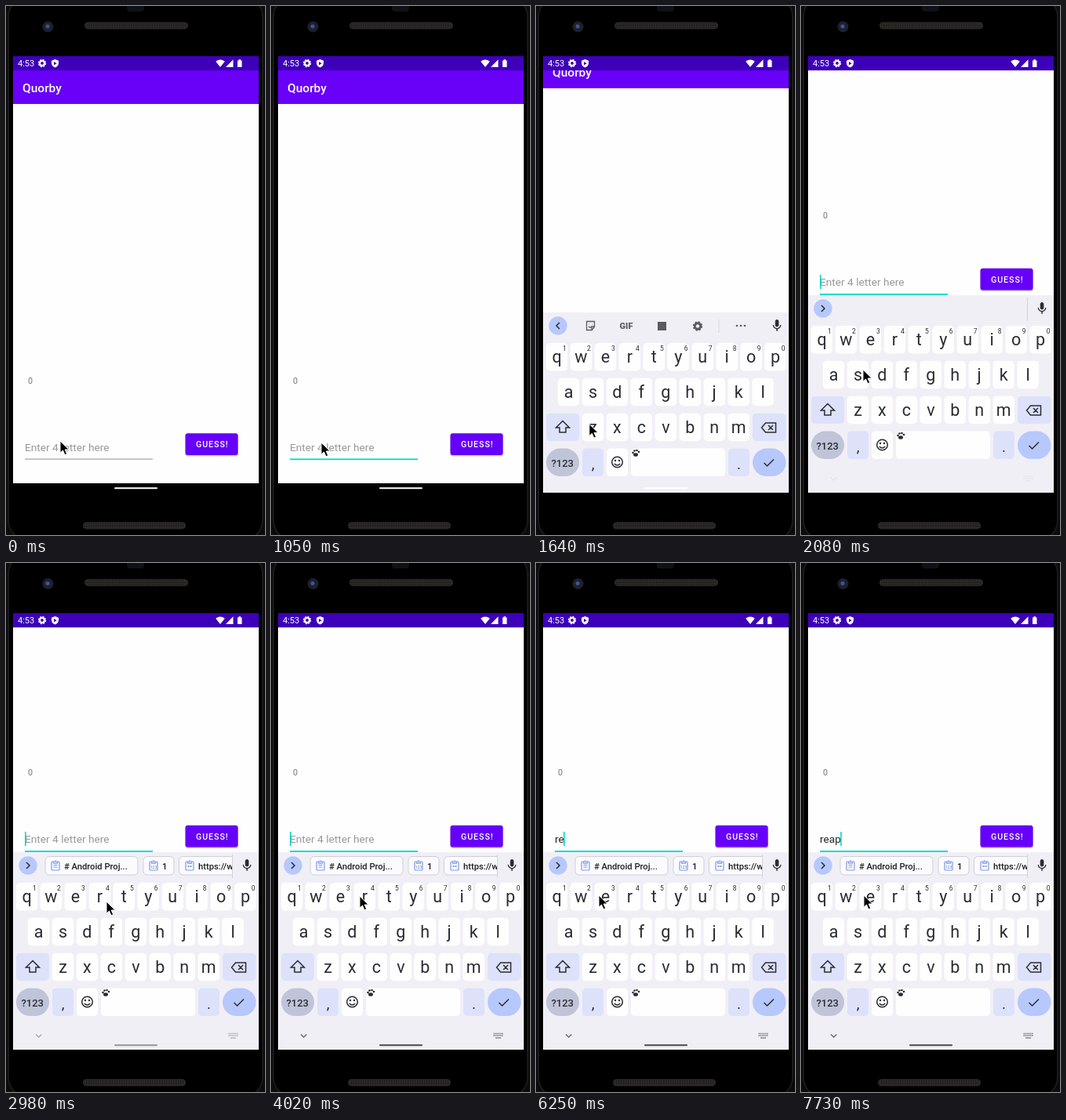
An HTML page for the animation above (8000 ms loop, 330 by 675 pixels).

```html
<!DOCTYPE html>
<html lang="en">
<head>
<meta charset="utf-8">
<style>
  html, body { margin: 0; width: 100%; height: 100%; overflow: hidden; background: #000; }
  svg { display: block; width: 330px; height: 675px; font-family: Roboto, sans-serif; }
  .m { font-weight: 500; }
  .c { text-anchor: middle; }
  .line { fill: none; stroke: #2b2c33; stroke-width: 1.5; }
</style>
</head>
<body>
<svg viewBox="0 0 330 675">
  <defs>
    <clipPath id="app"><rect x="9" y="82" width="313" height="527"/></clipPath>
    <clipPath id="screen"><rect x="9" y="82" width="313" height="539"/></clipPath>
    <clipPath id="strip"><rect x="40" y="370" width="248" height="34"/></clipPath>
    <pattern id="mesh" width="3" height="3" patternUnits="userSpaceOnUse">
      <rect width="3" height="3" fill="#2b2a28"/><rect width="1.5" height="1.5" fill="#181716"/>
    </pattern>
    <g id="gear" fill="none">
      <circle r="3.1" stroke-width="2.4"/>
      <circle r="4.4" stroke-width="1.6" stroke-dasharray="1.9 1.556"/>
    </g>
    <g id="clip" fill="none" stroke="#7f9bea" stroke-width="1.2">
      <rect x="-5" y="-5" width="10" height="11" rx="1"/>
      <path d="M-2.5-5v2.2h5V-5M-1.2-6h2.4"/>
    </g>
  </defs>

  <!-- phone body -->
  <rect width="330" height="675" fill="#0b0b0c"/>
  <rect x="3" y="-12" width="324" height="694" rx="26" stroke="#1a1a1c" stroke-width="2"/>
  <path d="M154 0h22v3q0 4-4 4h-14q-4 0-4-4z" fill="#0f1116"/>
  <circle cx="53.500" cy="26.500" r="7" fill="#202024"/>
  <circle cx="53.500" cy="26.500" r="4.500" fill="#1a2040"/>
  <circle cx="53" cy="26" r="2.500" fill="#42548f"/>
  <g fill="url(#mesh)" stroke="#38362f" stroke-width=".8">
    <rect x="100.500" y="21" width="131" height="8" rx="4"/>
    <rect x="98.500" y="659" width="130" height="8" rx="4"/>
  </g>

  <!-- app -->
  <g clip-path="url(#app)">
    <rect x="9" y="82" width="313" height="527" fill="#fefefe"/>
    <g id="page">
      <rect x="9" y="82" width="313" height="43" fill="#6900f8"/>
      <text x="21" y="109.500" class="m" font-size="15.5" fill="#fff">Quorby</text>
      <text x="28" y="481.700" font-size="10.7" fill="#757575">0</text>
      <text id="field" x="24" y="567.700" font-size="13.700"></text>
      <rect id="rule" x="24" width="163"/>
      <rect id="caret" y="553.500" width="1.600" height="18" fill="#03dac5"/>
      <rect x="228.500" y="546.500" width="67.500" height="28" rx="3" fill="#000" opacity=".22"/>
      <rect x="228.500" y="545.300" width="67" height="27.700" rx="3" fill="#6600f8"/>
      <text x="242" y="563.300" class="m" font-size="10.67" letter-spacing=".95" fill="#fff">GUESS!</text>
    </g>
  </g>

  <!-- keyboard -->
  <g clip-path="url(#screen)">
    <g id="board">
      <rect x="9" y="369" width="313" height="252" fill="#f1eff6"/>
      <circle cx="28" cy="386" r="11.700" fill="#b7c8fd"/>
      <path id="arrow" class="line"/>
      <g id="tools" fill="#5b5c62" stroke="#5b5c62">
        <path d="M64.500 380.500h10v7l-3.500 4h-6.500zM71 391v-4h4M67 384h.5M71.500 384h.5M67 387q2 2 4 0" fill="none" stroke-width="1.3"/>
        <text x="115" y="390" class="c" font-size="11" font-weight="900" stroke="none">GIF</text>
        <rect x="155" y="381" width="11" height="11" stroke="none"/>
        <use href="#gear" transform="translate(206 386.500) scale(1.200)"/>
        <path d="M233 378v17" stroke="#d6d5dc"/>
        <path d="M256 386h.01M261 386h.01M266 386h.01" stroke-width="2.700" stroke-linecap="round"/>
      </g>
      <g id="chips" clip-path="url(#strip)">
        <g fill="#fbfafd" stroke="#cfcfd8">
          <rect x="50" y="374.500" width="118" height="23.500" rx="5"/>
          <rect x="175" y="374.500" width="39" height="23.500" rx="5"/>
          <rect x="220.500" y="374.500" width="90" height="23.500" rx="5"/>
        </g>
        <use href="#clip" x="63" y="386"/><use href="#clip" x="188" y="386"/><use href="#clip" x="234" y="386"/>
        <path d="M60.500 385.500h5M60.500 388h5" stroke="#7f9bea"/>
        <text x="188" y="390" class="c m" font-size="5" fill="#7f9bea">123</text>
        <path d="M231.500 387h5" stroke="#7f9bea" stroke-width="2" stroke-dasharray="2 1"/>
        <g class="m" font-size="11.200" fill="#1f2024">
          <text x="74" y="390.800"># Android Proj...</text>
          <text x="199" y="390.800">1</text>
          <text x="245" y="390.800">https://www</text>
        </g>
      </g>
      <path id="split" d="M288.500 372v30" stroke="#d3d2d9"/>
      <path transform="translate(297.800 376.500) scale(.77)" fill="#2b2c33" d="M12 14c1.660 0 3-1.340 3-3V5c0-1.660-1.340-3-3-3S9 3.340 9 5v6c0 1.660 1.340 3 3 3zm5.300-3c0 3-2.540 5.100-5.300 5.100S6.700 14 6.700 11H5c0 3.410 2.720 6.230 6 6.720V21h2v-3.280c3.280-.48 6-3.300 6-6.720z"/>
      <g id="keys"></g>
      <g class="line">
        <path d="M34 507.500l8.500 8.500h-4.500v6h-8v-6h-4.500z"/>
        <path d="M292.500 510h13v12h-13l-5-6zM296 513l6 6M302 513l-6 6"/>
        <circle cx="103.500" cy="560" r="6.800"/>
        <path d="M99.800 562q3.700 4 7.400 0"/>
        <path d="M290.500 561l4 4 8.500-8.500"/>
      </g>
      <g fill="#2b2c33">
        <circle cx="101" cy="558" r="1.200"/><circle cx="106" cy="558" r="1.200"/>
        <circle cx="123.500" cy="548" r="1.300"/><circle cx="125.500" cy="545.500" r="1.300"/>
        <circle cx="128.500" cy="545" r="1.300"/><circle cx="131" cy="547" r="1.300"/>
        <ellipse cx="127" cy="550.500" rx="3" ry="2.300"/>
      </g>
      <g id="nav">
        <path d="M38 601.500l3.700 3.500 3.700-3.500" fill="none" stroke="#66676d" stroke-width="1.300"/>
        <path d="M283.500 600.500h12M283.500 603h12" stroke="#77787e" stroke-width="1.500" stroke-dasharray="1.500 .6"/>
        <path d="M286 606h7" stroke="#77787e" stroke-width="1.300"/>
      </g>
    </g>
  </g>
  <rect id="pill" x="138" y="614.300" width="55" height="1.900" rx="1"/>

  <!-- status bar -->
  <rect x="9" y="64" width="313" height="18.200" fill="#3d00b8"/>
  <g fill="#fff">
    <text x="15" y="77.300" font-size="11">4:53</text>
    <use href="#gear" x="46" y="73" stroke="#fff"/>
    <path d="M62.500 68l4.500 1.800v3q0 4-4.500 5.600q-4.500-1.600-4.500-5.600v-3z"/>
    <path d="M61 71l3.700 2.200-3.700 2.200z" fill="#3d00b8"/>
    <path d="M273 78l-5.800-7.200q5.800-4.800 11.600 0zM280 78h9.500v-9.700zM295 69.500h1.500v-1.200h2.500v1.200h1.500V78h-5.500z"/>
  </g>

  <path id="mouse" d="M0 0v15.300l3.500-3.300 2.500 5.800 2.700-1.200-2.500-5.600h5z" stroke="#fff" stroke-width="1"/>
</svg>

<script>
const $ = id => document.getElementById(id);
const set = (id, attrs) => { for (const k in attrs) $(id).setAttribute(k, attrs[k]); };

// keys
const LILAC = '#dde2fa', INK = '#2b2c33';
let html = '';
const key = (x, y, w, fill, r = 5) =>
  html += `<rect x="${x}" y="${y}" width="${w}" height="35.5" rx="${r}" fill="${fill}"/>`;
const label = (s, x, y, size, cls = 'c') =>
  html += `<text x="${x}" y="${y}" class="${cls}" font-size="${size}" fill="${INK}">${s}</text>`;

[['qwertyuiop', 26.5, 408], ['asdfghjkl', 41.5, 452.7], ['zxcvbnm', 72.5, 497.8]].forEach(([row, x0, y], r) =>
  [...row].forEach((ch, i) => {
    const x = x0 + i * 30.95;
    key(x - 13.7, y, 27.4, '#fefefe');
    label(ch, x, y + 25, 21.5);
    if (!r) label((i + 1) % 10, x + 10, y + 9.5, 8.5);
  }));
key(13, 497.8, 42, LILAC);
key(276, 497.8, 42.5, LILAC);
key(13, 542.6, 42, '#c0c4d9', 17.7);
key(59, 542.6, 27, LILAC);
key(90, 542.6, 27, '#fefefe');
key(121, 542.6, 120, '#fefefe');
key(245, 542.6, 27, LILAC);
key(276, 542.6, 42.5, '#b7c8fd', 17.7);
label('?123', 33.7, 566, 13, 'c m');
label(',', 72.5, 569, 19);
label('.', 258.5, 569, 19);
$('keys').innerHTML = html;

// timing
const LOOP = 8000;
const STEPS = [0, 300, 750, 1050, 1200, 1350, 1490, 1640, 1790, 1930, 2080, 2230, 2380, 2530, 2680, 2980, 3130,
  3430, 3580, 3730, 3870, 4020, 4320, 4620, 4770, 4920, 5070, 5360, 5510, 5650, 5800, 5950, 6100, 6250,
  6550, 6990, 7440, 7730];
const CARET_ON = [[300, 1050], [1930, 2380], [2980, 3430], [3870, 4320], [4620, 5070], [5360, 5800], [6100, 6550], [6990, LOOP]];
const TYPED = [[4620, 'r', 28.7], [5360, 're', 35.9], [7440, 'rea', 43.4], [7730, 'reap', 51]];
const MOUSE = [[300, 69, 555], [750, 64, 557], [1490, 64, 557], [2080, 79, 464], [2230, 82, 460], [2680, 128, 432],
  [3430, 128, 432], [4020, 113, 425], [4320, 112, 425], [5070, 81, 425], [5510, 62, 437], [5800, 60, 453], [6250, 80, 424]];
const PAN = [[1490, 0], [1640, 20], [1790, 150], [1930, 210.5]];
const DROP = [[1200, 252], [1490, 79], [1640, 22], [1790, 0]];
const SHOW = [[1200, 0], [1490, .65], [1640, 1]];

// linear interpolation through [time, value...] points
function at(points, t, k = 1) {
  const i = points.findIndex(p => p[0] > t);
  if (i === 0) return points[0][k];
  if (i < 0) return points[points.length - 1][k];
  const a = points[i - 1], b = points[i];
  return a[k] + (b[k] - a[k]) * (t - a[0]) / (b[0] - a[0]);
}
const ramp = (t, from, to) => Math.min(1, Math.max(0, (t - from) / (to - from)));

function draw(now) {
  const time = now % LOOP;
  const t = STEPS.filter(s => s <= time).pop();
  const focus = t >= 300, open = t >= 1930;
  const typed = TYPED.filter(w => w[0] <= t).pop();

  $('field').textContent = typed ? typed[1] : 'Enter 4 letter here';
  set('field', { fill: typed ? '#222' : '#989898' });
  set('rule', focus ? { y: 577.5, height: 1.8, fill: '#03dac5' } : { y: 577.6, height: 1, fill: '#8f8f8f' });
  set('caret', { x: typed ? typed[2] - .8 : 24, opacity: +CARET_ON.some(([a, b]) => t >= a && t < b) });
  set('page', { transform: `translate(0 ${-at(PAN, t)})` });

  set('board', { transform: `translate(0 ${at(DROP, t)})`, opacity: at(SHOW, t) });
  set('arrow', { d: open ? 'M26 382l4 4-4 4' : 'M30 382l-4 4 4 4' });
  set('tools', { opacity: 1 - ramp(t, 1640, 1930) });
  set('split', { opacity: +open });
  set('chips', { opacity: ramp(t, 2230, 2530) });
  set('nav', { opacity: ramp(t, 1880, 4020) });
  set('pill', t < 1790 ? { fill: '#fff', opacity: 1 } : { fill: '#48484c', opacity: ramp(t, 2080, 3730) });

  set('mouse', { transform: `translate(${at(MOUSE, t)} ${at(MOUSE, t, 2)})` });
}

let start;
function tick(now) {
  start ??= now;
  draw(now - start);
  requestAnimationFrame(tick);
}
draw(0);
requestAnimationFrame(tick);
</script>
</body>
</html>
```
